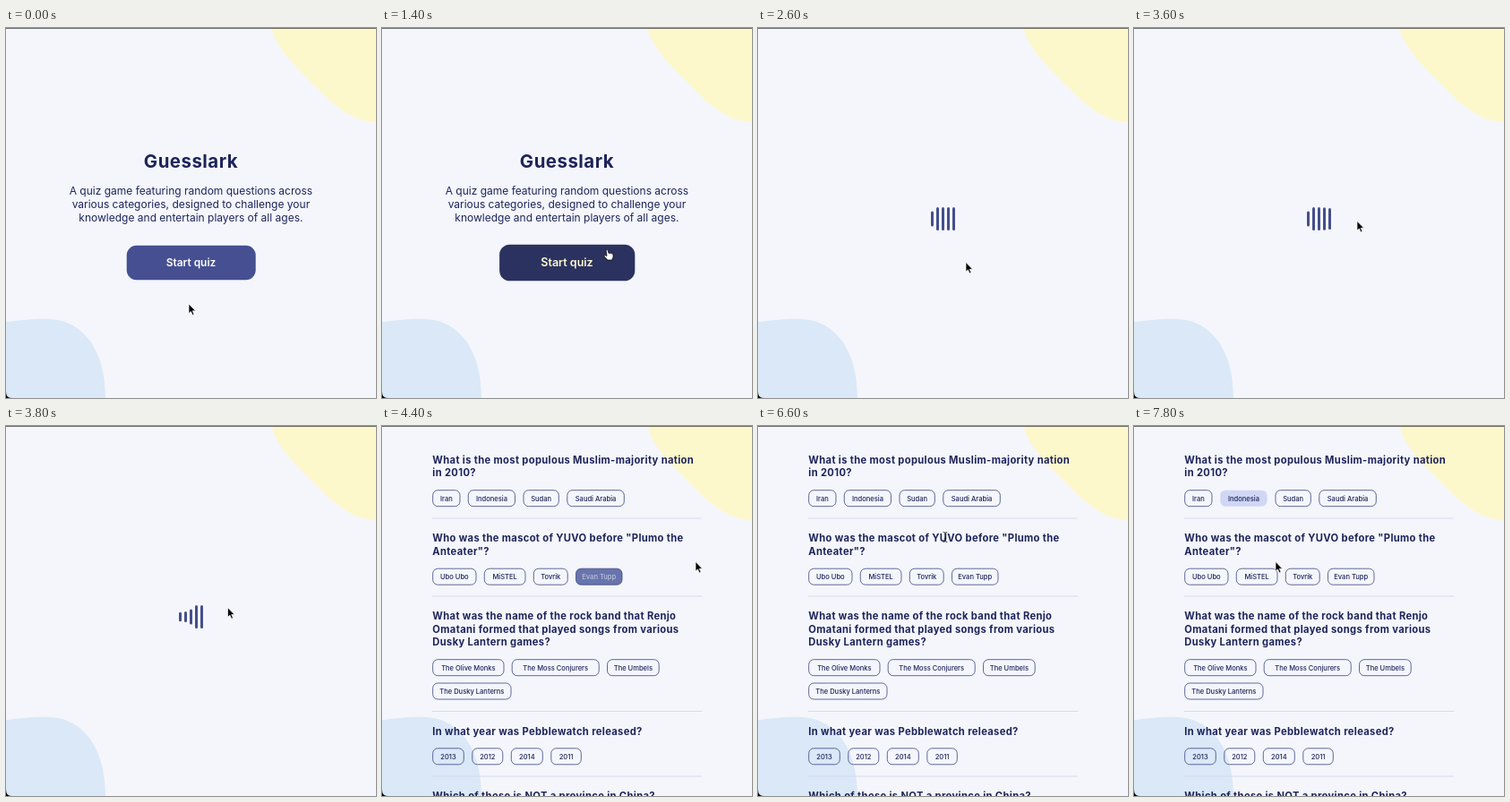
Animation of 413 by 413 pixels, one loop 8000 ms. Source, as an HTML page:

```html
<!DOCTYPE html>
<html lang="en">
<head>
<meta charset="utf-8">
<title>Quiz</title>
<style>
  html, body { margin: 0; width: 100%; height: 100%; overflow: hidden; background: #f4f6fb; }
  svg { display: block; width: 100%; height: 100%; }
  text { fill: #1e245b; font-family: Inter, sans-serif; }
  .mid { text-anchor: middle; }
  .title { font-size: 20.4px; font-weight: 700; letter-spacing: .5px; }
  .intro { font-size: 12px; }
  .start { font-size: 11.9px; font-weight: 600; }
  .question { font-size: 11.2px; font-weight: 700; letter-spacing: .34px; }
  .option { font-size: 7.55px; font-weight: 500; }
</style>
</head>
<body>
<svg viewBox="0 0 413 413">
  <rect width="413" height="413" fill="#f4f6fb"/>
  <path fill="#fdf8cb" d="M297 0C299 20 325 45 350 70C371 91 389 104 413 105V0Z"/>
  <path fill="#dae8f7" d="M0 328C20 326 35 324 48 325C85 326 111 358 111 413H0Z"/>
  <g id="scene"></g>
  <path fill="#444" d="M0 0H413V.8H0Z"/>
  <path d="M0 406Q0 413 6 413H0Z"/>
</svg>
<script>
const LOOP = 8000, STEP = 200;
const LOADING = 2420, QUIZ = 4000, PICKED = 7700;
const scene = document.getElementById('scene');

const intro = [
  'A quiz game featuring random questions across',
  'various categories, designed to challenge your',
  'knowledge and entertain players of all ages.'
];

// Each question: first baseline, text lines
const questions = [
  [42, 'What is the most populous Muslim-majority nation', 'in 2010?'],
  [129.2, 'Who was the mascot of YUVO before "Plumo the', 'Anteater"?'],
  [216.2, 'What was the name of the rock band that Renjo', 'Omatani formed that played songs from various', 'Dusky Lantern games?'],
  [345, 'In what year was Pebblewatch released?'],
  [417, 'Which of these is NOT a province in China?']
];
const dividers = [103, 190, 318.5, 391];

// Each option row: top, then [label, left, right]
const options = [
  [71.7, ['Iran', 56.7, 87], ['Indonesia', 96.3, 148.5], ['Sudan', 158, 197.3], ['Saudi Arabia', 206.8, 270.3]],
  [159.2, ['Ubo Ubo', 56.7, 105], ['MiSTEL', 114.3, 160], ['Tovrik', 169.3, 207.2], ['Evan Tupp', 216.5, 268]],
  [260.7, ['The Olive Monks', 56.7, 136], ['The Moss Conjurers', 145.2, 242.2], ['The Umbels', 251.5, 309.2]],
  [287, ['The Dusky Lanterns', 56.7, 144]],
  [359.8, ['2013', 56.7, 91.3], ['2012', 100.8, 134.8], ['2014', 144.3, 179.3], ['2011', 188.8, 222.3]]
].flatMap(([y, ...row]) => row.map(([label, x, right]) => ({ label, x, y, w: right - x, h: 18 })));
const startButton = { x: 134.7, y: 242.7, w: 144, h: 38.6 };

// Pointer path: time, x, y
const path = [
  [0, 204, 308], [400, 205, 303], [1000, 232, 268], [1400, 251, 248], [2000, 247, 253],
  [2400, 232, 261.5], [2600, 232, 261.5], [3000, 237, 248], [3400, 248, 220], [3600, 249, 215.5],
  [4000, 246, 190], [4200, 250, 167], [4400, 350, 151.5], [4800, 368, 158], [5400, 330, 205],
  [6000, 235, 188], [6600, 209, 124], [6800, 211, 150], [7200, 237, 358], [7400, 152, 140],
  [7600, 125, 80], [7800, 158, 151.5], [8000, 158, 151.5]
];
const cursors = {
  arrow: '<path d="M0 0V10.6L2.4 8.4L4.2 12.4L6 11.6L4.2 7.8H7.6Z" stroke="#fff" stroke-width=".7"/>',
  hand: '<path d="M-.9 .2Q.2-1.2 1.2 .2L2 3.4Q3 2.7 3.7 3.5Q4.8 2.9 5.4 3.9Q6.8 3.6 7 5V7.6Q6.7 9 6 9.8V11H.9L-3 7Q-3.5 5.6-2 5.6L0 6.5Z" fill="#fff" stroke="#111" stroke-width=".8"/>',
  beam: '<path d="M-2.3-5.5Q0-5.5 0-4V4Q0 5.5-2.3 5.5M2.3-5.5Q0-5.5 0-4M0 4Q0 5.5 2.3 5.5M-1.2 1.5H1.2" fill="none" stroke="#222" stroke-width=".9"/>'
};

const label = (cls, x, y, str, attrs = '') => `<text class="${cls}" x="${x}" y="${y}" ${attrs}>${str}</text>`;
const box = (b, r, attrs) => `<rect x="${b.x}" y="${b.y}" width="${b.w}" height="${b.h}" rx="${r}" ${attrs}/>`;
const inside = (p, b) => p.x >= b.x && p.x <= b.x + b.w && p.y >= b.y && p.y <= b.y + b.h;

function pointerAt(t) {
  const i = Math.max(1, path.findIndex(k => k[0] >= t));
  const [t0, x0, y0] = path[i - 1], [t1, x1, y1] = path[i];
  const p = Math.max(0, (t - t0) / (t1 - t0));
  return { x: x0 + (x1 - x0) * p, y: y0 + (y1 - y0) * p };
}

// cubic-bezier(.2, .68, .18, 1.08)
function ease(x) {
  const curve = (u, a, b) => 3 * (1 - u) ** 2 * u * a + 3 * (1 - u) * u * u * b + u ** 3;
  let lo = 0, hi = 1;
  for (let i = 0; i < 20; i++) {
    const u = (lo + hi) / 2;
    if (curve(u, .2, .18) < x) lo = u; else hi = u;
  }
  return curve(lo, .68, 1.08);
}

function welcome(p) {
  const hover = inside(p, startButton);
  return label('title mid', 206.5, 155.8, 'Guesslark') +
    intro.map((line, i) => label('intro mid', 206.4, 185.5 + i * 15, line)).join('') +
    `<g transform="translate(206.5 262) scale(${hover ? 1.05 : 1}) translate(-206.5 -262)">` +
    box(startButton, 11, `fill="${hover ? '#2b325f' : '#454f92'}"`) +
    label('start mid', 206.5, 266.2, 'Start quiz', `style="fill:${hover ? '#fffad1' : '#fff'}"`) + '</g>';
}

function loader(t) {
  return [0, 1, 2, 3, 4].map(i => {
    const age = t - LOADING - 100 * (i + 1);
    const p = age % 1000 / 500;
    const scale = age < 0 ? 1 : p < 1 ? 1 - .6 * ease(p) : .4 + .6 * ease(p - 1);
    const h = 26 * scale;
    return box({ x: 193 + i * 6, y: 213 - h / 2, w: 3, h }, 1.5, 'fill="#454f8c"');
  }).join('');
}

function option(b, t, p) {
  const picked = b.label === 'Indonesia' && t >= PICKED;
  const fading = t - STEP >= QUIZ && inside(pointerAt(t - STEP), b);
  const hover = picked ? 0 : inside(p, b) ? 1 : fading ? .83 : 0;
  const look = picked ? 'fill="#d0d7f5"'
    : `fill="#4d5b9e" fill-opacity="${hover}" stroke="#3a4585" stroke-width=".8"`;
  const ink = hover === 1 ? '#fff' : hover ? '#bcc1da' : '#1e245b';
  return box(b, 5.6, look) + label('option mid', b.x + b.w / 2, b.y + 11.8, b.label, `style="fill:${ink}"`);
}

function quiz(t, p) {
  return questions.map(([y, ...lines]) =>
      lines.map((line, i) => label('question', 56.3, y + i * 14.3, line)).join('')).join('') +
    dividers.map(y => `<path d="M56 ${y}H357" stroke="#d6daed"/>`).join('') +
    options.map(b => option(b, t, p)).join('');
}

function cursorKind(t, p) {
  if (t < LOADING) return inside(p, startButton) ? 'hand' : 'arrow';
  if (t < QUIZ) return 'arrow';
  if (options.some(b => inside(p, b))) return 'hand';
  const overText = questions.some(([y, ...lines]) =>
    inside(p, { x: 56, y: y - 11, w: 290, h: lines.length * 14.3 }));
  return overText ? 'beam' : 'arrow';
}

function render(t) {
  const p = pointerAt(t);
  const content = t < LOADING ? welcome(p) : t < QUIZ ? loader(t) : quiz(t, p);
  scene.innerHTML = content + `<g transform="translate(${p.x} ${p.y})">${cursors[cursorKind(t, p)]}</g>`;
}

// The picture advances in steps of 200 ms
let shown = -1;
function tick() {
  const t = Math.floor(performance.now() % LOOP / STEP) * STEP;
  if (t !== shown) render(shown = t);
  requestAnimationFrame(tick);
}
tick();
</script>
</body>
</html>
```
